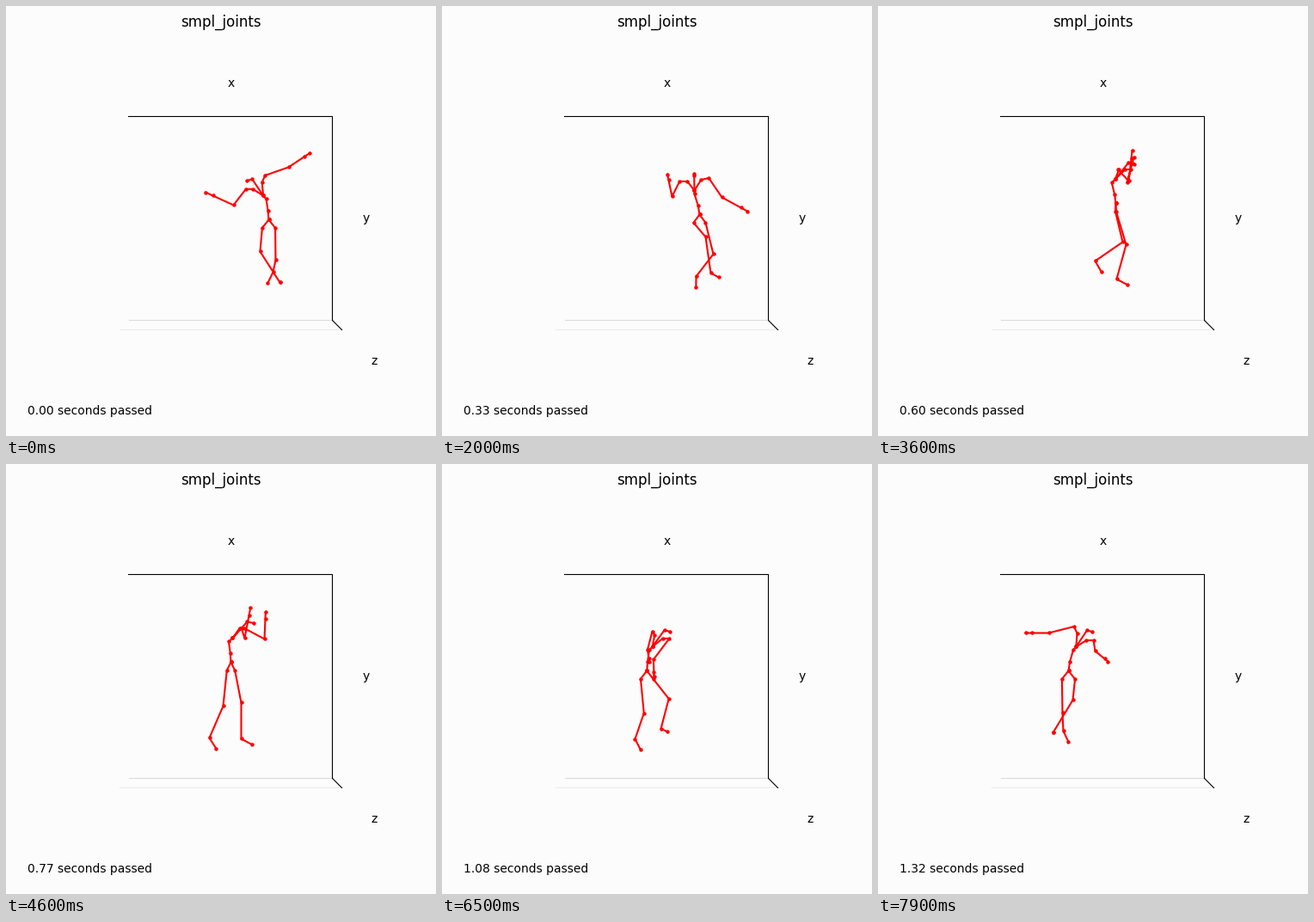
Recreate the animation shown at these times as a matplotlib script. Size 500x500 px, loop 8 s.

```python
import numpy as np
import matplotlib.pyplot as plt
from matplotlib.animation import FuncAnimation

SIZE, DPI = 500, 100
FRAMES, STEP_MS, FPS = 80, 100, 60
BG = "#fcfcfc"
POSES = (0, 20, 36, 46, 58, 71, 79)

plt.rcParams["font.family"] = "DejaVu Sans"


def path(*points, also=None):
    """Smooth curve through one point per pose, plus extra {time: point}."""
    knots = sorted({**dict(zip(POSES, points)), **(also or {})}.items())
    keys = np.array([k for k, _ in knots], float)
    pts = np.array([p for _, p in knots], float)
    slope = np.gradient(pts, keys, axis=0)

    def at(t):
        k = int(np.clip(np.searchsorted(keys, t, "right") - 1, 0, len(keys) - 2))
        h = keys[k + 1] - keys[k]
        u = (t - keys[k]) / h
        ease = u * u * (3 - 2 * u)
        return (pts[k] + (pts[k + 1] - pts[k]) * ease
                + h * u * (1 - u) * ((1 - u) * slope[k] - u * slope[k + 1]))

    return at


# Only the free joints are keyed; the others follow from the body's turn
pelvis = path((306, 249), (300, 243), (277, 230), (262, 231), (248, 238), (231, 242), (222, 241))

l_knee = path((296, 286), (307, 269), (289, 278), (274, 278), (271, 282), (253, 268), (227, 275))
l_ankle = path((319, 322), (313, 311), (278, 318), (274, 320), (269, 322), (237, 300), (204, 313))
r_knee = path((314, 296), (316, 289), (285, 275), (253, 282), (245, 288), (226, 291), (215, 290))
r_ankle = path((311, 310), (296, 315), (253, 297), (237, 319), (231, 321), (220, 318), (216, 311))

l_elbow = path((265, 232), (268, 222), (292, 204), (301, 204), (261, 219), (247, 229), (253, 218),
               also={54: (283, 212)})
l_wrist = path((241, 221), (264, 203), (295, 178), (302, 181), (272, 212), (246, 252), (264, 227),
               also={54: (303, 191)})
r_elbow = path((329, 188), (326, 223), (290, 206), (278, 203), (262, 207), (219, 218), (199, 197),
               also={10: (336, 198)})
r_wrist = path((347, 176), (348, 235), (296, 184), (283, 177), (270, 194), (212, 240), (179, 197),
               also={10: (361, 187)})


def arm(chest, side, turn, lift, elbow, wrist):
    """Side is +1 for the right arm, -1 for the left."""
    c, s = np.cos(turn), side * np.sin(turn)
    collar = chest + (9 * c + 8 * s, -11.5 - side * 4 * lift)
    shoulder = collar + (3 * c + 9 * s, -8 * lift * (side > 0))
    hand = wrist + 0.35 * (wrist - elbow)
    return [chest, collar, shoulder, elbow, wrist, hand]


def skeleton(t):
    """Joint chains at frame t, in pixels."""
    turn = np.radians(-45 + 200 / (1 + np.exp((t - 29) / 12)))
    c = np.cos(turn)
    phase = np.pi * t / (FRAMES - 1)
    lift, reach = np.cos(phase) ** 4, np.sin(phase)
    bend = -6 * np.cos(np.pi * (t - 22) / 66)

    root = pelvis(t)
    waist = root + (0.3 * bend, -10.6)
    back = root + (bend, -24)
    chest = back + (4.5 * c, -4)
    neck = chest + (17 * c, -19)
    head = neck + (8 * c, 1.5)

    hip = 8 * np.sin(turn - np.radians(30))
    la, ra = l_ankle(t), r_ankle(t)
    return [
        [root, root + (-hip, 9.5), l_knee(t), la, la + (13 * reach, 7 * reach)],
        [root, root + (hip, 9.5), r_knee(t), ra, ra + (8 * c, 12.5)],
        [root, waist, back, chest, neck, head],
        arm(chest, -1, turn, lift, l_elbow(t), l_wrist(t)),
        arm(chest, 1, turn, lift, r_elbow(t), r_wrist(t)),
    ]


fig = plt.figure(figsize=(SIZE / DPI, SIZE / DPI), dpi=DPI, facecolor=BG)
ax = fig.add_axes([0, 0, 1, 1])
ax.set(xlim=(0.5, SIZE + 0.5), ylim=(SIZE + 0.5, 0.5))
ax.axis("off")


def edge(xs, ys, color="black"):
    ax.plot(xs, ys, color=color, lw=0.8)


edge([143, 380], [366, 366], "#dcdcdc")
edge([132, 391], [377, 377], "#ebebeb")
edge([143, 380, 380, 391], [129, 129, 366, 377])

for name, x, y in [("x", 262.5, 90.5), ("y", 419.5, 247.5), ("z", 429, 414)]:
    ax.text(x, y, name, fontsize=10, ha="center", va="center")

fig.suptitle("smpl_joints", fontsize=12)
clock = fig.text(0.05, 0.05, "", fontsize=10)
limbs = [ax.plot([], [], "o-", color="red", lw=1.5, ms=2.2, mew=1)[0] for _ in range(5)]


def update(i):
    for line, joints in zip(limbs, skeleton(i)):
        line.set_data(*np.transpose(joints))
    clock.set_text(f"{i / FPS:.2f} seconds passed")
    return [*limbs, clock]


anim = FuncAnimation(fig, update, frames=FRAMES, interval=STEP_MS,
                     repeat=True, repeat_delay=0)
plt.show()
```
